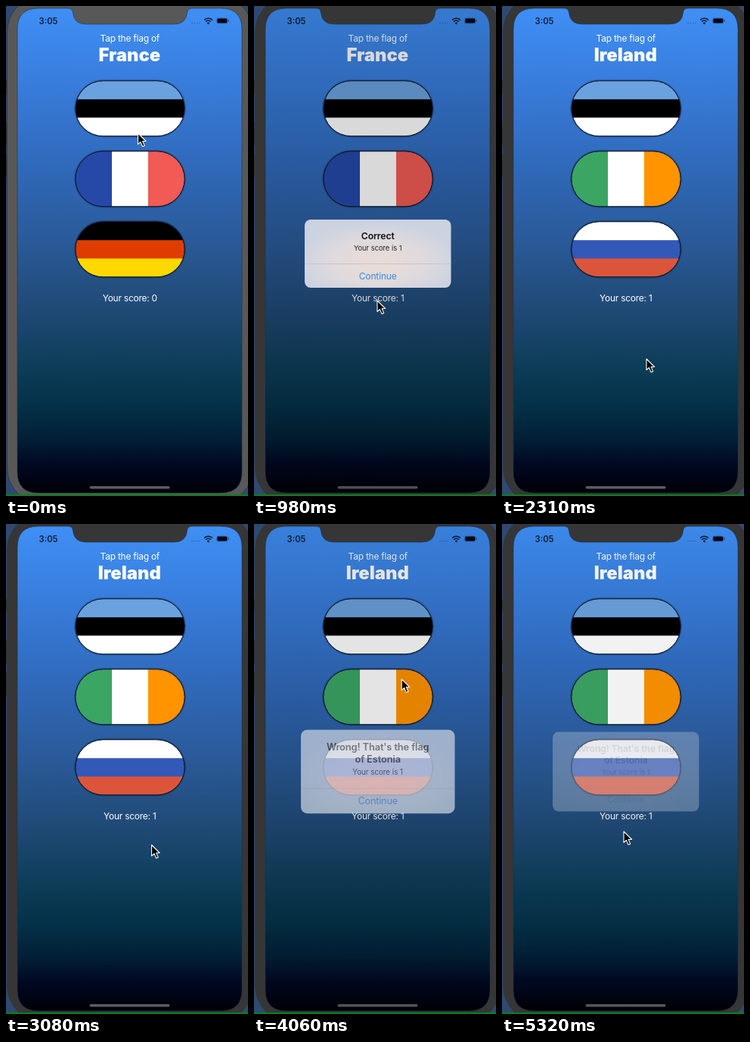
These frames come from a looping animation (320x647 px, 5.39 s). An HTML page:

```html
<!DOCTYPE html>
<html lang="en">
<head>
<meta charset="utf-8">
<title>Guess the flag</title>
<style>
  html, body { margin: 0; width: 100%; height: 100%; overflow: hidden; background: #2f4a72; }
  svg { display: block; width: 100vw; height: 100vh; }
  text { font-family: Inter, "Liberation Sans", sans-serif; text-anchor: middle; }
  .label { font-size: 11.9px; letter-spacing: -.2px; fill: #fff; }
  .country { font-size: 23.8px; font-weight: 900; fill: #fff; }
  .title { font-size: 12.2px; font-weight: 600; letter-spacing: -.1px; fill: #101014; }
  .note { font-size: 9.3px; fill: #22222a; }
  .action { font-size: 12px; letter-spacing: -.15px; fill: #3c8ae2; }
</style>
</head>
<body>
<svg viewBox="0 0 320 647" preserveAspectRatio="none">
  <defs>
    <linearGradient id="sky" x1="0" y1="0" x2="0" y2="1">
      <stop offset="0" stop-color="#3f8ff5"/>
      <stop offset=".12" stop-color="#3a81e2"/>
      <stop offset=".3" stop-color="#316cc0"/>
      <stop offset=".48" stop-color="#2a5a98"/>
      <stop offset=".62" stop-color="#204a76"/>
      <stop offset=".74" stop-color="#0d3d58"/>
      <stop offset=".82" stop-color="#043148"/>
      <stop offset=".89" stop-color="#021f36"/>
      <stop offset=".94" stop-color="#010822"/>
      <stop offset="1" stop-color="#000006"/>
    </linearGradient>
    <radialGradient id="glow0" cy=".62" r=".58">
      <stop offset="0" stop-color="#eadcd6"/>
      <stop offset=".55" stop-color="#dfdadd"/>
      <stop offset="1" stop-color="#cbd2e0"/>
    </radialGradient>
    <radialGradient id="glow1" cy=".6" r=".58">
      <stop offset="0" stop-color="#e2dce4"/>
      <stop offset=".55" stop-color="#dadde8"/>
      <stop offset="1" stop-color="#ced6e3"/>
    </radialGradient>
    <clipPath id="capsule"><rect x="92" width="144" height="72.600" rx="36.300"/></clipPath>
    <filter id="shadow" x="-10%" y="-10%" width="120%" height="120%">
      <feDropShadow dx="0" dy="0" stdDeviation="1" flood-color="#000" flood-opacity=".7"/>
    </filter>
    <path id="screen" d="M43 3H82Q88 3 88.500 9Q90 24 106 24H222Q238 24 239.500 9Q240 3 246 3H284Q312 3 312 31V615Q312 643 284 643H43Q15 643 15 615V31Q15 3 43 3Z"/>
  </defs>

  <path d="M0 98h3v18H0zM0 154h3v30H0zM0 196h3v30H0z" fill="#30343c"/>
  <rect id="bezel" x="1.500" y="-13" width="325" height="670" rx="47" stroke="#34383f"/>
  <use href="#screen" fill="url(#sky)" stroke="#1b3358" stroke-width=".6"/>

  <text x="56" y="24" font-size="11.200" font-weight="600" fill="#101f38">3:05</text>
  <g fill="#2e62b0">
    <circle cx="246" cy="22.500" r=".8"/><circle cx="249.300" cy="22.500" r=".8"/>
    <circle cx="252.600" cy="22.500" r=".8"/><circle cx="255.900" cy="22.500" r=".8"/>
  </g>
  <g fill="none" stroke="#0c1a30" stroke-width="1.600">
    <path d="M262 18.500q5.500-4.500 11 0M264 20.700q3.500-2.800 7 0"/>
    <circle cx="267.500" cy="22.800" r=".6"/>
  </g>
  <rect x="278.500" y="15.800" width="14.500" height="7.500" rx="2.200" fill="#245297"/>
  <rect x="279.500" y="16.800" width="12.500" height="5.500" rx="1.300" fill="#040810"/>
  <path d="M294 18v3" stroke="#17345f"/>

  <text class="label" x="163.800" y="46.500">Tap the flag of</text>
  <text id="country" class="country" x="163.300" y="73"></text>
  <g id="flags"></g>
  <text id="score" class="label" x="163.800" y="390"></text>
  <rect x="110.500" y="634" width="106" height="3.600" rx="1.800" fill="#5c5c60"/>

  <use id="dim" href="#screen"/>
  <g id="alerts"></g>
  <path id="cursor" d="M0 0V14.600L3.400 11.500L6.100 17.600L8.700 16.400L6.100 10.500H10.600Z" fill="#000" stroke="#fff" stroke-width="1.100" stroke-linejoin="round"/>
  <rect y="645" width="320" height="2" fill="#0a8018"/>
</svg>

<script>
const LOOP = 5390, NEXT_ROUND = 1820, SCORED = 420;
const $ = id => document.getElementById(id);

const FLAGS = {
  estonia: { colors: ['#6ba2df', '#000', '#fff'] },
  france: { colors: ['#2848a8', '#fff', '#f15a55'], vertical: true },
  germany: { colors: ['#000', '#df3c02', '#ffd802'] },
  ireland: { colors: ['#3ba564', '#fff', '#ff9300'], vertical: true },
  russia: { colors: ['#fff', '#3058b8', '#dc543a'] }
};
const ROUNDS = [
  { country: 'France', flags: ['estonia', 'france', 'germany'] },
  { country: 'Ireland', flags: ['estonia', 'ireland', 'russia'] }
];
const ALERTS = [
  { y: 282, h: 90, title: ['Correct'], open: 480, close: 1370 },
  { y: 274.5, h: 105, title: ["Wrong! That's the flag", 'of Estonia'], open: 3880, close: 5130 }
];
// Pointer stops: time, x, y
const POINTER = [
  [0, 174.5, 168], [300, 164, 228], [440, 164, 228], [980, 163, 389],
  [1260, 161, 354], [1580, 161, 354], [2200, 191, 466], [2900, 191, 466],
  [3700, 203, 142], [3900, 203, 142], [4410, 170, 408], [4850, 162, 366],
  [5120, 162, 366], [5320, 161, 406], [5390, 161, 408]
];

const clamp = v => Math.max(0, Math.min(1, v));
const smooth = v => (v = clamp(v), v * v * (3 - 2 * v));

function flagMarkup(name, row) {
  const { colors, vertical } = FLAGS[name];
  const stripes = colors.map((color, i) => vertical
    ? `<rect x="${92 + i * 48}" width="49" height="73" fill="${color}"/>`
    : `<rect x="92" y="${i * 24.2}" width="144" height="25" fill="${color}"/>`).join('');
  return `<g transform="translate(0 ${99 + row * 93})" filter="url(#shadow)">
    <g clip-path="url(#capsule)">${stripes}</g>
    <rect x="91.8" y="-.2" width="144.4" height="73" rx="36.5" fill="none" stroke="#0b1526"/></g>`;
}

function alertMarkup({ y, h, title }, i) {
  const line = (cls, dy, text) => `<text class="${cls}" x="163.7" y="${y + dy}">${text}</text>`;
  const lastTitle = 26 + (title.length - 1) * 15.5;
  return `<g><rect x="67" y="${y}" width="193.5" height="${h}" rx="8" fill="url(#glow${i})"/>
    <g><path d="M67 ${y + h - 31.5}h193.5" stroke="#b9bdca" stroke-width=".7"/>
    ${title.map((text, n) => line('title', 26 + n * 15.5, text)).join('')}
    ${line('note', lastTitle + 15, 'Your score is 1')}
    ${line('action', h - 11.5, 'Continue')}</g></g>`;
}

$('flags').innerHTML = ROUNDS.map(r => `<g>${r.flags.map(flagMarkup).join('')}</g>`).join('');
$('alerts').innerHTML = ALERTS.map(alertMarkup).join('');

function pointerAt(t) {
  const i = POINTER.findIndex(stop => stop[0] > t);
  const [t0, x0, y0] = POINTER[i - 1], [t1, x1, y1] = POINTER[i];
  const k = smooth((t - t0) / (t1 - t0));
  return [x0 + (x1 - x0) * k, y0 + (y1 - y0) * k];
}

function draw(t) {
  const round = t < NEXT_ROUND ? 0 : 1;
  $('country').textContent = ROUNDS[round].country;
  [...$('flags').children].forEach((g, i) => g.style.display = i === round ? '' : 'none');
  $('score').textContent = `Your score: ${t < SCORED ? 0 : 1}`;

  const grey = Math.round(88 - 34 * smooth((t - 120) / 250));
  $('bezel').setAttribute('fill', `rgb(${grey},${grey},${grey})`);

  let shade = 0;
  ALERTS.forEach(({ y, h, open, close }, i) => {
    const shown = smooth((t - open) / 280);
    const alpha = shown * (1 - smooth((t - close) / 310));
    const panel = $('alerts').children[i], cy = y + h / 2;
    const scale = 1.18 - .18 * shown;
    panel.setAttribute('opacity', alpha);
    panel.setAttribute('transform', `translate(163.7 ${cy}) scale(${scale}) translate(-163.7 ${-cy})`);
    // Text fades faster than its panel.
    panel.lastElementChild.setAttribute('opacity', alpha);
    shade = Math.max(shade, alpha);
  });
  $('dim').setAttribute('fill-opacity', .15 * shade);
  $('cursor').setAttribute('transform', `translate(${pointerAt(t)})`);
}

const start = performance.now();
function frame() {
  draw((performance.now() - start) % LOOP);
  requestAnimationFrame(frame);
}
frame();
</script>
</body>
</html>
```
